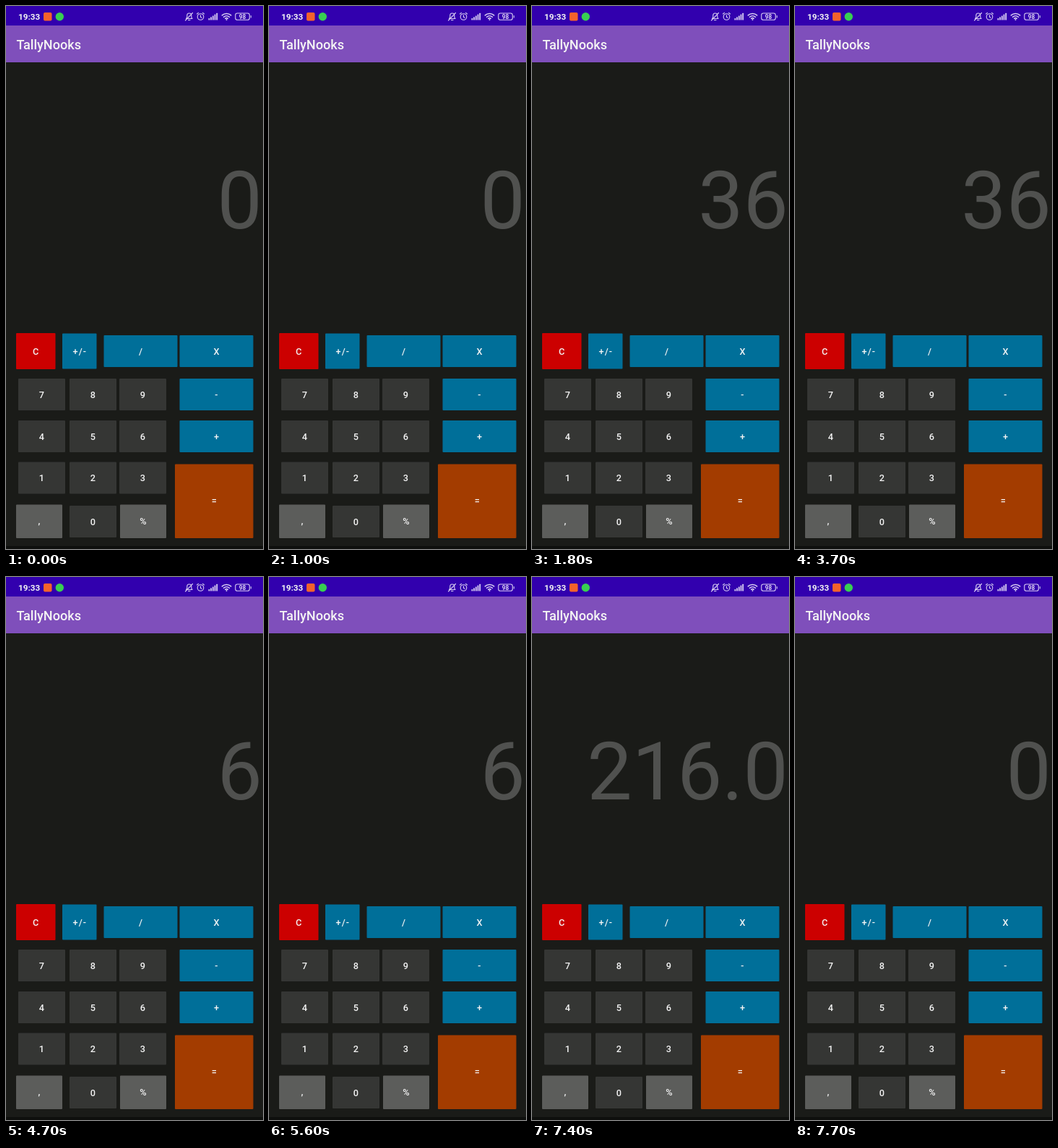
An HTML page that plays this animation: 356 px wide and 752 px high, repeating every 8 s.

```html
<!DOCTYPE html>
<html lang="en">
<head>
<meta charset="utf-8">
<title>Calculator</title>
<style>
  html, body { margin: 0; width: 100%; height: 100%; overflow: hidden; background: #1a1b18; }
  svg { display: block; width: 356px; height: 752px; font-family: Roboto, sans-serif; fill: #f4f4f4; }
  #keys text { font-size: 12.7px; font-weight: 500; letter-spacing: 1.1px; text-anchor: middle; }
  #icons { fill: none; stroke: #d9cff2; stroke-width: 1.1; stroke-linecap: round; stroke-linejoin: round; }
  #icons .solid { fill: #d9cff2; stroke: none; }
</style>
</head>
<body>
<svg viewBox="0 0 356 752">
  <rect width="356" height="752" fill="#1a1b18"/>
  <rect y="748" width="356" height="4" fill="#0e0f0d"/>
  <rect y="27" width="356" height="51" fill="#7f4fbb"/>
  <rect width="356" height="27" fill="#3200ae"/>

  <text x="17" y="18.8" font-size="11.7" font-weight="700">19:33</text>
  <rect x="52" y="9" width="11.5" height="11.5" rx="2" fill="#f4622c"/>
  <circle cx="74.3" cy="14.7" r="5.7" fill="#38cf52"/>

  <g id="icons">
    <path d="M249.5 17.5h8.5l-1.2-2v-2.500a3 3 0 0 0-6 0v2.500zM252.500 19.500h2.500M258.500 9.500l-10 10.500"/>
    <circle cx="269.500" cy="15" r="4.300"/>
    <path d="M269.500 12.800v2.400l1.600 1M264.500 11l2-1.700M274.500 11l-2-1.700"/>
    <g class="solid" id="signal"></g>
    <path stroke-width="1.500" d="M299.300 12.900a9 9 0 0 1 12.400 0M301.500 15.200a6 6 0 0 1 8 0M303.700 17.300a3 3 0 0 1 3.600 0"/>
    <circle class="solid" cx="305.500" cy="19" r="1"/>
    <rect x="317.800" y="10" width="19.500" height="9.300" rx="2.600"/>
    <path d="M339.300 13.500v2.400"/>
    <text class="solid" x="327.500" y="17.700" font-size="8.300" font-weight="700" text-anchor="middle">98</text>
  </g>

  <text x="14.500" y="60" font-size="18.100" font-weight="500">TallyNooks</text>
  <text id="display" x="355" y="308" font-size="111" text-anchor="end" fill="#50514f">0</text>
  <g id="keys"></g>
</svg>
<script>
const LOOP = 8000;
const BLUE = '#006f99', DARK = '#353634', GREY = '#5c5d5b', PRESSED = '#2e2f2d';
const svgElement = (parent, name, attributes) => {
  const node = document.createElementNS('http://www.w3.org/2000/svg', name);
  for (const key in attributes) node.setAttribute(key, attributes[key]);
  return parent.appendChild(node);
};

const keys = document.getElementById('keys');
function addKey(label, x, y, width, height, fill) {
  const face = svgElement(keys, 'rect', { x, y, width, height, fill, rx: 1 });
  svgElement(keys, 'text', { x: x + width / 2 + 0.5, y: y + height / 2 + 4.7 }).textContent = label;
  return face;
}

addKey('C', 14, 453, 54.5, 50, '#cc0000');
addKey('+/-', 78, 453.5, 47.500, 49, BLUE);
addKey('/', 135.500, 456, 102, 44, BLUE);
addKey('X', 240.500, 456, 102, 44, BLUE);
addKey('-', 240.500, 516, 102, 44, BLUE);
addKey('+', 240.500, 574, 102, 44, BLUE);
addKey('=', 234, 634.500, 108.500, 102.500, '#a33c00');
addKey(',', 14, 690.500, 64, 46.500, GREY);
addKey('0', 88, 692, 65, 44, DARK);
addKey('%', 158, 690.500, 64, 46.500, GREY);

const digitKeys = {};
[516, 574, 631.500].forEach((y, row) => [17, 88, 157].forEach((x, column) => {
  const digit = 7 - row * 3 + column;
  digitKeys[digit] = addKey(digit, x, y, 65, 44, DARK);
}));

const signal = document.getElementById('signal');
for (let i = 0; i < 5; i++) {
  const height = 2.5 + i * 1.8;
  svgElement(signal, 'rect', { x: 280.500 + i * 2.700, y: 19.500 - height, width: 1.800, height, rx: 0.5 });
}

// Display value from each moment on
const readings = [[0, '0'], [1400, '3'], [1800, '36'], [4700, '6'], [5700, '216.0'], [7700, '0']];
const display = document.getElementById('display');

function render(now) {
  const time = now % LOOP;
  display.textContent = readings.findLast(([start]) => time >= start)[1];
  digitKeys[6].setAttribute('fill', time >= 1800 && time < 2000 ? PRESSED : DARK);
  requestAnimationFrame(render);
}
render(0);
</script>
</body>
</html>
```
